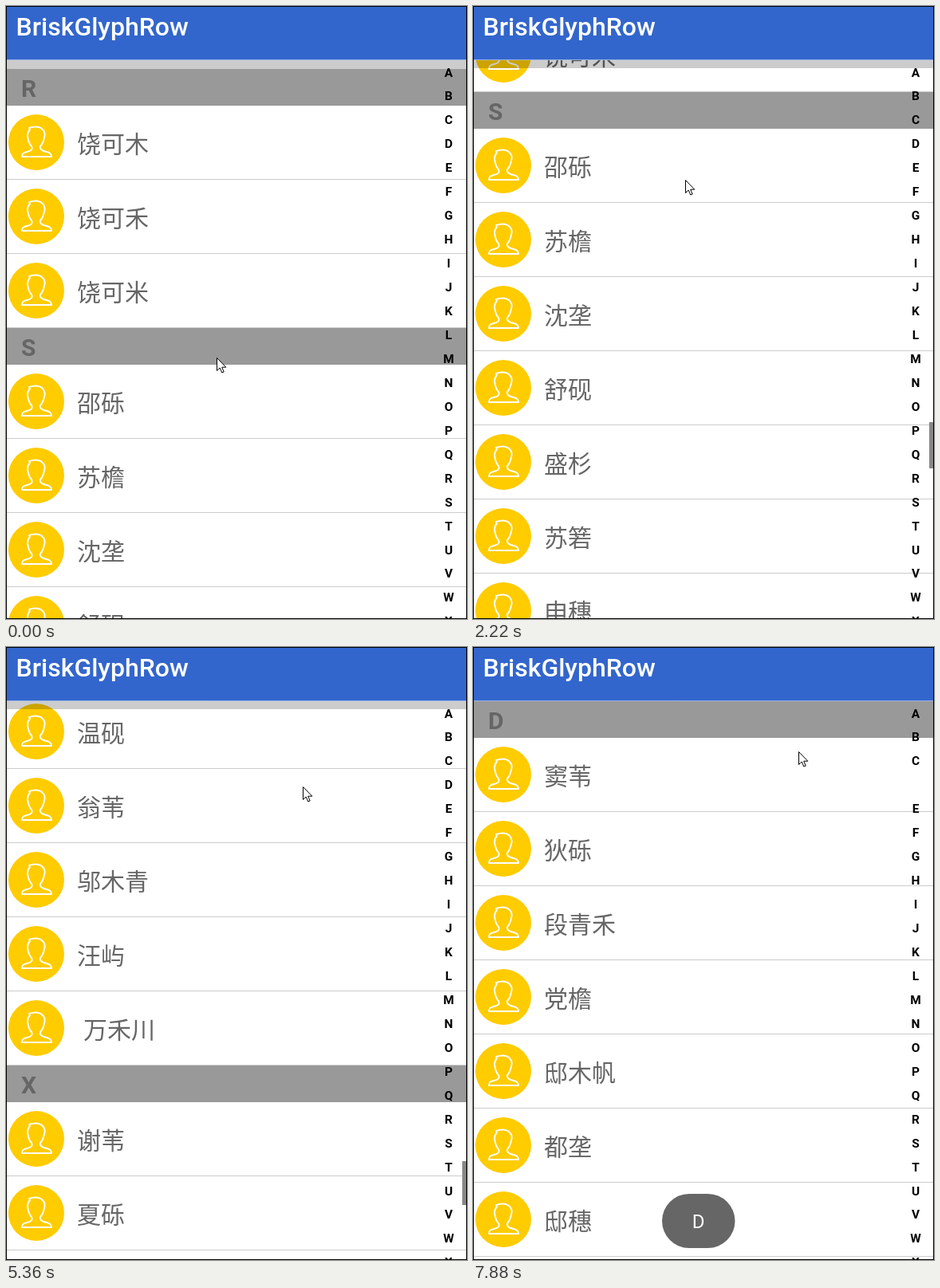
An HTML page that plays this animation: 578x769 px, repeating every 8 s.

```html
<!DOCTYPE html>
<html lang="zh-CN">
<head>
<meta charset="utf-8">
<title>Contact list</title>
<style>
  html, body { margin: 0; width: 100%; height: 100%; overflow: hidden; background: #fff; }
  svg { display: block; }
  text { font-family: Roboto, "Noto Sans", sans-serif; }
  .name { font: 30px "Noto Sans CJK SC", "Noto Sans CJK", sans-serif; fill: #666; }
  .head { font-size: 30px; font-weight: 700; fill: #666; }
  .index { font-size: 15.4px; font-weight: 700; text-anchor: middle; }
</style>
</head>
<body>
<svg id="stage" width="578" height="769" viewBox="0 0 578 769">
  <defs>
    <clipPath id="view"><rect x="1" y="68" width="576" height="700"/></clipPath>
    <g id="avatar">
      <circle r="35" fill="#fc0"/>
      <path d="M-6 5C-10 1-10-3-11-8C-11-11-10-14-8-16L-9-18C-3-20 4-20 8-16C11-13 11-9 10-6C9-1 8 2 5 5C4 9 8 11 13 12C18 13 19 15 19 18H-18C-18 14-16 13-12 12C-7 11-4 9-6 5Z"
        fill="none" stroke="#fff" stroke-width="1.9" stroke-linejoin="round"/>
    </g>
  </defs>
  <rect width="578" height="769" fill="#fff"/>
  <g clip-path="url(#view)">
    <g id="rows"></g>
    <rect x="1" y="68" width="576" height="10" fill="#000" opacity=".2"/>
    <g id="heads"></g>
    <rect id="thumb" x="572" width="5" fill="#888"/>
    <g id="letters"></g>
  </g>
  <rect width="578" height="67.5" fill="#36c"/>
  <text x="12.5" y="37" font-size="32" font-weight="500" fill="#fff">BriskGlyphRow</text>
  <g id="toast">
    <rect x="237" y="686" width="91.5" height="68" rx="34" fill="#666"/>
    <text id="toastText" x="282.7" y="729" font-size="24" fill="#fff" text-anchor="middle"></text>
  </g>
  <path id="cursor" d="M.5.5V16.5L4.2 13L6.8 19L9.2 18L6.7 12.2H11.8Z" fill="#fff" stroke="#000"/>
  <rect x=".5" y=".5" width="577" height="768" fill="none" stroke="#000"/>
</svg>
<script>
const LOOP = 8000, TOP = 68, ROW = 93, HEAD = 46, TOUCH = 6980;
const ALPHABET = 'ABCDEFGHIJKLMNOPQRSTUVWXYZ';
const sections = {
  A: '艾木舟',
  B: '柏苇,卞埂',
  C: '程砾,岑檐,崔帆,常垄,储穗',
  D: '窦苇,狄砾,段青禾,党檐,邸木帆,都垄,邸穗,狄帆',
  R: '饶可木,饶可禾,饶可米',
  S: '邵砾,苏檐,沈垄,舒砚,盛杉,苏箬,申穗,邵帆,沈礁,舒栈,桑木禾,盛苇',
  T: '谭砾,陶苇,唐埂,田禾穗',
  W: '温砚,翁苇,邬木青,汪屿, 万禾川',
  X: '谢苇,夏砾,许檐,辛垄,肖帆',
  Y: '余砚,叶埂'
};

// The picture only refreshes at these moments.
const ticks = [0, 100, 490, 600, 910, 1020, 1330, 1420, 1710, 1810, 2120, 2220,
  2530, 2620, 2930, 3030, 3340, 3440, 3750, 3840, 4150, 4250, 4560, 4660, 4970,
  5040, 5360, 5460, 5770, 5860, 6180, 6250, 6560, 6670, 6980, 7380, 7470, 7780, 7880];

// time, value...
const scrollPath = [[0, 0], [600, 0], [910, 2], [1020, 6], [2220, 296], [3030, 370],
  [3440, 440], [4150, 735], [4660, 1150], [5360, 1970], [5860, 2369]];
const thumbPath = [[910, 503, 54], [1020, 503, 54], [2220, 522, 58], [4150, 552, 61],
  [5360, 645, 55], [5860, 674, 54]];
const cursorPath = [[0, 264, 441], [100, 256, 461], [490, 250, 480], [600, 247, 492],
  [1020, 244, 467], [2220, 266, 218], [3340, 250, 430], [4150, 245, 308],
  [4660, 270, 215], [5360, 372, 175], [5860, 418, 120], [6180, 416, 85],
  [6250, 418, 61], [6670, 412, 50], [6980, 412, 50], [7380, 411, 66],
  [7470, 411, 85], [7780, 409, 110], [7880, 408, 131]];

const $ = id => document.getElementById(id);

function add(parent, tag, attrs, text) {
  const el = document.createElementNS('http://www.w3.org/2000/svg', tag);
  for (const k in attrs) el.setAttribute(k, attrs[k]);
  if (text) el.textContent = text;
  parent.appendChild(el);
  return el;
}

function along(path, t) {
  let i = 0;
  while (i < path.length - 2 && t >= path[i + 1][0]) i++;
  const a = path[i], b = path[i + 1];
  const p = Math.min(1, Math.max(0, (t - a[0]) / (b[0] - a[0])));
  return a.slice(1).map((v, k) => v + (b[k + 1] - v) * p);
}

const headY = {};
let y = 0;
for (const key in sections) {
  headY[key] = y;
  add($('heads'), 'rect', { x: 1, y, width: 576, height: HEAD, fill: '#999' });
  add($('heads'), 'text', { x: 19, y: y + 35, class: 'head' }, key);
  y += HEAD;
  for (const name of sections[key].split(',')) {
    add($('rows'), 'use', { href: '#avatar', x: 38, y: y + 46 });
    add($('rows'), 'text', { x: name[0] === ' ' ? 97 : 89, y: y + 59, class: 'name' }, name.trim());
    add($('rows'), 'rect', { x: 1, y: y + 92, width: 576, height: 1, fill: '#ccc' });
    y += ROW;
  }
}

const letters = [...ALPHABET].map((c, i) =>
  add($('letters'), 'text', { x: 555, y: 88.5 + i * 29.95, class: 'index' }, c));

function draw(time) {
  const t = ticks.filter(k => k <= time).pop();
  const [cx, cy] = along(cursorPath, t);
  $('cursor').setAttribute('transform', `translate(${Math.round(cx)} ${Math.round(cy)})`);

  // The finger runs at 1.3 times the pointer's height.
  const picked = t < TOUCH ? -1 : Math.max(0, Math.floor((cy * 1.3 - TOP) / 30));
  const letter = ALPHABET[picked];
  const shift = letter ? TOP - headY[letter]
    : 79 - headY.R - Math.round(along(scrollPath, t)[0]);
  for (const id of ['rows', 'heads']) $(id).setAttribute('transform', `translate(0 ${shift})`);
  letters.forEach((el, i) => el.setAttribute('fill', i === picked ? '#fff' : '#000'));

  $('toast').setAttribute('visibility', letter ? 'visible' : 'hidden');
  $('toastText').textContent = letter || '';

  const [ty, th] = along(thumbPath, t);
  $('thumb').setAttribute('y', Math.round(ty));
  $('thumb').setAttribute('height', Math.round(th));
  $('thumb').setAttribute('opacity', t < 910 || t >= 6560 ? 0 : t >= 6250 ? 0.5 : 1);
}

const start = performance.now();
function frame() {
  draw((performance.now() - start) % LOOP);
  requestAnimationFrame(frame);
}
frame();
</script>
</body>
</html>
```
